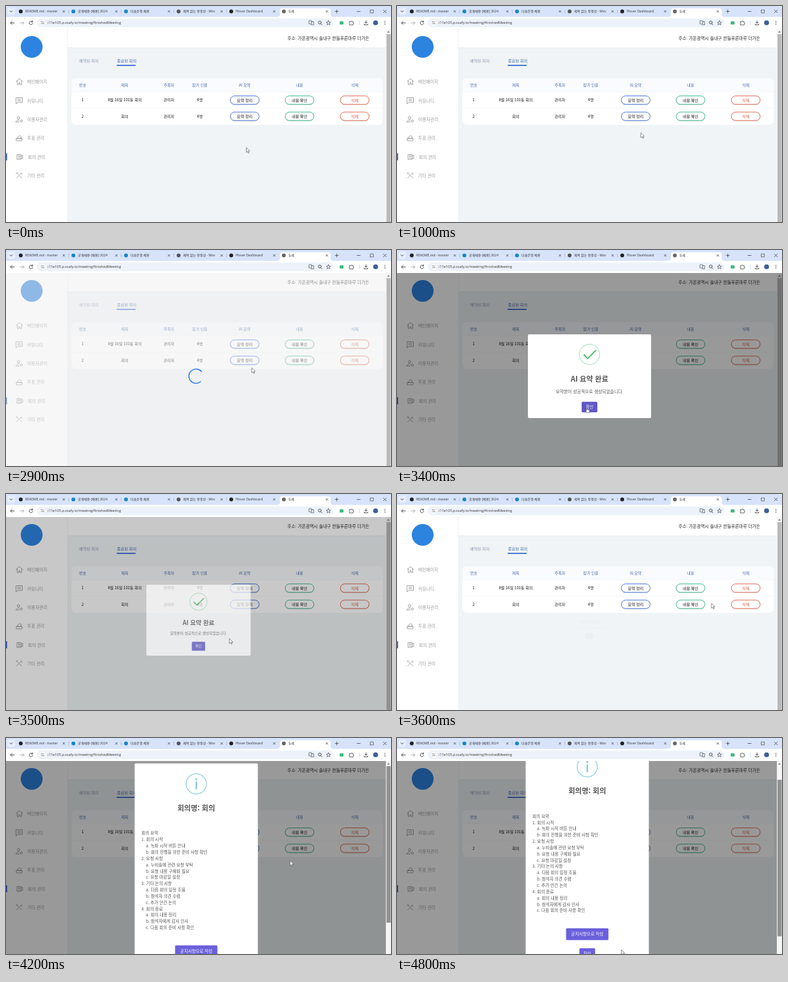
Animation of 600 by 338 pixels, one loop 5.2 s. Source, as an HTML page:

```html
<!DOCTYPE html>
<html lang="ko">
<head>
<meta charset="utf-8">
<title>회의 관리</title>
<style>
html, body { margin: 0; height: 100%; overflow: hidden; background: #fff; }
svg { display: block; width: 100vw; height: 100vh; font-family: "Noto Sans CJK KR", "Noto Sans CJK", sans-serif; }
.browser { font-family: "Open Sans", "Noto Sans CJK KR", sans-serif; }
.line { fill: none; stroke-linecap: round; stroke-linejoin: round; }
</style>
</head>
<body>
<svg id="stage" viewBox="0 0 600 338" preserveAspectRatio="none"></svg>
<script>
const LOOP = 5200;

// ---- drawing helpers: each returns SVG markup ----
const rect = (x, y, w, h, fill, r = 0, extra = '') =>
  `<rect x="${x}" y="${y}" width="${w}" height="${h}" rx="${r}" fill="${fill}" ${extra}/>`;
const disc = (x, y, r, fill, extra = '') => `<circle cx="${x}" cy="${y}" r="${r}" fill="${fill}" ${extra}/>`;
const line = (d, stroke, width = 0.9, extra = '') =>
  `<path class="line" d="${d}" stroke="${stroke}" stroke-width="${width}" ${extra}/>`;
const text = (x, y, str, size, fill, anchor = 'start', weight = 400) =>
  `<text x="${x}" y="${y + size * 0.36}" font-size="${size}" fill="${fill}" text-anchor="${anchor}" font-weight="${weight}">${str}</text>`;
const group = (id, body, extra = '') => `<g id="${id}" ${extra}>${body}</g>`;
const cross = (x, y, r, color, width) =>
  line(`M${x - r} ${y - r}l${2 * r} ${2 * r}m0 ${-2 * r}l${-2 * r} ${2 * r}`, color, width);
const scrollbarParts = (height, color, id) =>
  rect(592, 36, 8, 302, '#f4f4f4') + '<path d="M594 41.5l2-2.5l2 2.5z" fill="#777"/>' +
  rect(593, 44, 6.5, height, color, 0, `id="${id}"`);

function browser() {
  const tabs = [
    ['README.md - master', '#222'], ['공개채용-[채용] 2024', '#1787c9'], ['다솜은행 채용', '#1787c9'],
    ['제목 없는 동영상 - Mov', '#555'], ['Plover Dashboard', '#222'], ['두레', '#666']
  ];
  let out = rect(0, 0, 600, 36, '#d6e3fa') + rect(2, 2.5, 12, 11.5, '#e6eefc', 3) +
    line('M6 7.5l2 2l2-2', '#333') +
    '<path d="M421 17.5q6 0 6-5v-5q0-4 4-4h71q4 0 4 4v5q0 5 6 5z" fill="#fff"/>' +
    rect(0, 17, 600, 19, '#fff') + rect(48, 19.5, 462, 13.5, '#edf2fa', 6.7);
  tabs.forEach(([title, color], i) => {
    const x = 23 + i * 82;
    out += disc(x, 8.5, 3, color) + text(x + 7, 8.5, title, 5.1, '#333') + cross(x + 67, 8.5, 1.4, '#333', 0.7);
    if (i < 4) out += rect(x + 74, 5.5, 0.6, 6, '#9aabc8');
  });
  const dark = '#444';
  return out +
    line('M513 8.5h5m-2.5-2.5v5M547 8.5h5', dark, 0.8) +
    line('M568 6.2h4.6v4.6h-4.6z', dark, 0.7) + cross(590.5, 8.5, 2.2, dark, 0.8) +
    line('M13 26.5h-6m2.6-2.6l-2.6 2.6l2.6 2.6', dark) +
    line('M22 26.5h6m-2.6-2.6l2.6 2.6l-2.6 2.6', '#aaa') +
    line('M41.2 24.8a2.8 2.8 0 1 0 .5 2.2m-.4-4v2h-2', dark) +
    disc(57, 26.3, 4.5, '#fff') + line('M54.7 25h2.6m1.5 0h.4M54.7 27.7h.4m1.5 0h2.6', dark, 0.8) +
    text(65, 26.4, 'i11e105.p.ssafy.io/meeting/finishedMeeting', 5.63, '#333') +
    line('M472.5 23h4v5h-4zM476.5 24.5h3v5h-4', '#566', 0.8) +
    line('M490.5 27.8l1.8 1.8m-1-3.8a2.3 2.3 0 1 1-4.6 0a2.3 2.3 0 1 1 4.6 0', dark) +
    line('M502.5 23l1 2.2l2.3.2l-1.8 1.6l.6 2.4l-2.1-1.3l-2.1 1.3l.6-2.4l-1.8-1.6l2.3-.2z', dark, 0.7) +
    rect(520, 24, 6, 5, '#3dbb80', 1) +
    line('M535.5 24.5h1.7a1 1 0 1 1 2 0h1.8v1.7a1 1 0 1 1 0 2v1.5h-5.5z', dark, 0.8) +
    rect(550, 23, 0.7, 7, '#b9cdf0') +
    line('M561 23v4m-1.8-1.7l1.8 1.8l1.8-1.8m-4.6 3v1.2h5.6v-1.2', dark) +
    disc(576, 26.3, 3.8, '#3f5f96') +
    [24, 26.4, 28.8].map(y => disc(590.5, y, 0.7, dark)).join('');
}

function sidebar() {
  const items = [
    ['메인페이지', 'M16 118l5-4.5l5 4.5m-8.5-1v6h2.5v-3h2v3h2.5v-6'],
    ['커뮤니티', 'M16 143.5h9.5v7.5h-7.5l-2 2zM18.2 146h5m-5 2.3h5'],
    ['이용자관리', 'M21.5 175a2 2 0 1 1-4 0a2 2 0 1 1 4 0M15.5 181.5q0-3.2 5-3m-5 3h5m5-1.5a1.7 1.7 0 1 1-3.4 0a1.7 1.7 0 1 1 3.4 0'],
    ['투표 관리', 'M16 207.5v3.5h9v-3.5l-1.5-1.5M17.5 206l-1.5 1.5h9M18 205.5l3.5-3l2.5 2.5l-3 2.5z'],
    ['회의 관리', 'M17.5 232.5h6v7.5h-6zM23.5 235l2.5-1.5v5.5l-2.5-1.5M21.7 235a1.2 1.2 0 1 1-2.4 0a1.2 1.2 0 1 1 2.4 0M18.8 238.5q1.7-2 3.4 0'],
    ['기타 관리', 'M16.5 261l8 8m-8 0l3.3-3.3m1.8-1.8l2.9-2.9M15.8 262.5l2.2-2M23.2 262l2 1.5']
  ];
  return rect(0, 36, 96, 302, '#fff') + disc(40, 64, 17, '#2d83e0') +
    items.map(([label, icon], i) =>
      line(icon, '#999') + text(i === 4 ? 34 : 33, 119 + i * 29.3, label, 6.8, '#999')).join('') +
    rect(0, 230.5, 1.6, 11, '#3454c8');
}

function pill(x, y, label, color, ink) {
  return rect(x - 22.5, y - 5.6, 45, 13.4, '#00000020', 6.7) +
    rect(x - 22.4, y - 6.6, 44.8, 13.2, '#fff', 6.6, `stroke="${color}" stroke-width=".95"`) +
    text(x, y, label, 6.2, ink, 'middle', 500);
}

function table() {
  const columns = [119.5, 185, 254, 302, 372, 457.5, 543.5];
  const heads = ['번호', '제목', '주최자', '참가 인원', 'AI 요약', '내용', '삭제'];
  const rows = [['1', '8월 16일 101동 회의'], ['2', '회의']];
  const [, , , , summary, detail, remove] = columns;
  let out = rect(102, 113, 485, 73, '#fff', 7) +
    '<path d="M102 134v-14q0-7 7-7h471q7 0 7 7v14z" fill="#f9fbfe"/>' +
    heads.map((h, i) => text(columns[i], 124, h, 6, '#4569a8', 'middle', 500)).join('');
  rows.forEach((row, i) => {
    const y = 147.3 + i * 25.3;
    out += rect(102, y - 13, 485, 0.6, '#eef1f4') +
      [...row, '관리자', '4명'].map((s, c) => text(columns[c], y, s, 6, '#111', 'middle', 500)).join('') +
      pill(summary, y, '요약 정리', '#3b6fd6', '#111') +
      pill(detail, y, '내용 확인', '#35b38c', '#111') +
      pill(remove, y, '삭제', '#dd6549', '#d9583c');
  });
  return out;
}

function page() {
  return rect(96, 36, 504, 302, '#f0f4f6') + rect(96, 65, 496, 1, '#e6ebee') + rect(96, 36, 496, 29, '#fff') +
    text(566, 50.3, '주소: 가온광역시 솔내구 한들푸른마루 더가든', 6.75, '#222', 'end', 500) +
    text(114, 85.5, '예약된 회의', 6.2, '#8794ab') +
    text(173, 85.3, '종료된 회의', 6.2, '#3e63ad', 'start', 500) + rect(172.5, 92, 29.5, 1.7, '#3465d4') +
    table() + sidebar() + rect(95.6, 36, 0.7, 302, '#e9edef') + scrollbarParts(294, '#b9b9b9', 'pageThumb');
}

// Dialogs are drawn around x = 0 with their top edge at y = 0.
const button = (y, w, h, label, id) =>
  rect(-w / 2, y - h / 2, w, h, '#6a60dc', 1.6, `id="${id}"`) + text(0, y, label, 6.6, '#fff', 'middle', 500);

const doneDialog = () => rect(-96, 0, 192, 131, '#fff', 2) +
  disc(0, 31.3, 15.8, 'none', 'stroke="#b9e8cb" stroke-width="1.3"') +
  line('M-8.5 32l5.5 5.8l12.5-12.5', '#48bd62', 1.9, 'id="check" pathLength="1" stroke-dasharray="1 2"') +
  text(0, 70, 'AI 요약 완료', 11.25, '#545454', 'middle', 600) +
  text(0, 89.5, '요약본이 성공적으로 생성되었습니다.', 6.75, '#545454', 'middle') +
  button(113.7, 24.5, 16.5, '확인', 'confirm');

function notesDialog() {
  const notes = [
    '회의 요약', '1. 회의 시작', 'a. 녹화 시작 버튼 안내', 'b. 회의 진행을 위한 준비 사항 확인',
    '2. 요청 사항', 'a. 누비솔에 관련 요청 부탁', 'b. 요청 내용 구체화 필요', 'c. 요청 마감일 설정',
    '3. 기타 논의 사항', 'a. 다음 회의 일정 조율', 'b. 참석자 의견 수렴', 'c. 추가 안건 논의',
    '4. 회의 종료', 'a. 회의 내용 정리', 'b. 참석자에게 감사 인사', 'c. 다음 회의 준비 사항 확인'
  ];
  return rect(-96, 0, 192, 345, '#fff', 2) +
    disc(0, 32, 15.8, 'none', 'stroke="#96d5e3" stroke-width="1.4"') +
    group('mark', rect(-0.9, 28.5, 1.8, 12, '#5bbdd8') + disc(0, 24.8, 1.3, '#5bbdd8')) +
    text(0, 70, '회의명: 회의', 11.25, '#545454', 'middle', 600) +
    notes.map((s, i) => text(/^[a-c]/.test(s) ? -78.5 : -85.5, 109.3 + i * 9.85, s, 6.6, '#545454')).join('') +
    button(294, 66, 18.5, '공지사항으로 작성', 'post') + button(324.5, 24.5, 17, '확인', 'close');
}

const stage = document.getElementById('stage');
stage.innerHTML = '<clipPath id="view"><rect y="36" width="600" height="302"/></clipPath>' +
  `<g clip-path="url(#view)">${page()}` +
  group('loading', rect(0, 36, 592, 302, '#f0f0f0', 0, 'opacity=".5"') +
    group('spinner', line('M7.9 7.9A11.2 11.2 0 1 0-7.9 7.9', '#2b7ce6', 1.4))) +
  rect(0, 36, 600, 302, '#000', 0, 'id="shade"') +
  group('done', doneDialog()) + group('notes', notesDialog()) +
  group('scrollbar', scrollbarParts(245, '#919191', 'thumb')) +
  '</g>' + group('chrome', browser(), 'class="browser"') +
  group('arrow', '<path d="M0 0v7.6l1.8-1.6l1.3 2.8l1.3-.6l-1.3-2.7h2.5z" fill="#fff" stroke="#444" stroke-width=".6"/>') +
  group('hand', '<path d="M-.8 0q.8-.9 1.5 0v3l3 .8q.8.3.6 1.3l-.6 2.9h-4l-2.2-3q0-.9 1.7.1z" fill="#fff" stroke="#333" stroke-width=".6"/>');

const el = Object.fromEntries([...stage.querySelectorAll('[id]')].map(n => [n.id, n]));

// ---- motion ----
const clamp = v => Math.max(0, Math.min(1, v));
const progress = (t, from, span) => clamp((t - from) / span);
const smooth = v => v * v * (3 - 2 * v);
const set = (node, name, value) => node.setAttribute(name, value);
const show = (node, visible) => set(node, 'visibility', visible ? 'visible' : 'hidden');

// Interpolates [position, value...] stops; returns the values.
function track(stops, p, ease = v => v) {
  let i = 0;
  while (i < stops.length - 2 && p >= stops[i + 1][0]) i++;
  const [a, b] = [stops[i], stops[i + 1]];
  const k = ease(clamp((p - a[0]) / (b[0] - a[0])));
  return a.slice(1).map((v, n) => v + (b[n + 1] - v) * k);
}

const POP = [[0, 0.7], [0.45, 1.05], [0.8, 0.95], [1, 1]];
const TILT = [[0, 45, 0], [0.25, -25, 0.4], [0.5, 15, 0.8], [0.75, -5, 1], [1, 0, 1]];
const POINTER = [
  [0, 374.5, 221.5], [700, 374.5, 221.5], [1200, 383, 186], [1400, 376.5, 173.5], [2200, 376.5, 173.5],
  [2700, 383, 184.5], [2980, 383, 184.5], [3300, 296, 246.5], [3450, 296, 246.5], [3600, 490, 171],
  [3700, 458, 173.5], [4100, 458, 173.5], [4500, 362, 290], [4800, 349.5, 331.5], [LOOP, 349.5, 331.5]
];
const LOAD = 1600, DONE = 3000, CONFIRM = 3455, NOTES = 3660;

function place(node, x, y, height, scale, opacity) {
  set(node, 'transform', `translate(${x} ${y + height / 2}) scale(${scale}) translate(0 ${-height / 2})`);
  set(node, 'opacity', opacity);
}

function draw(t) {
  show(el.loading, t >= LOAD && t < DONE);
  set(el.spinner, 'transform', `translate(296.2 197.4) rotate(${120 + (t - 1900) * 0.515})`);

  const closing = progress(t, CONFIRM, 150);
  const doneOpen = t >= DONE && closing < 1;
  show(el.done, doneOpen);
  const doneScale = closing ? 1 - closing / 2 : track(POP, progress(t, DONE, 300))[0];
  place(el.done, 300, 132, 131, doneScale, 1 - closing);
  set(el.check, 'stroke-dashoffset', 1 - progress(t, DONE + 100, 250));
  show(el.check, doneOpen && t > DONE + 100);
  set(el.confirm, 'fill', t > 3250 ? '#5f56c8' : '#6a60dc');

  const scrollable = t >= NOTES + 300;
  const scroll = 26.75 * smooth(progress(t, 4300, 400));
  show(el.notes, t >= NOTES);
  show(el.scrollbar, scrollable);
  place(el.notes, scrollable ? 296.5 : 299.5, 39.75 - scroll, 345, track(POP, progress(t, NOTES, 300))[0], 1);
  const [tilt, ink] = track(TILT, progress(t, NOTES, 480));
  set(el.mark, 'transform', `rotate(${tilt} 0 32)`);
  set(el.mark, 'opacity', ink);
  set(el.thumb, 'y', 44 + scroll * 0.8);

  const dim = progress(t, DONE - 20, 100) * (1 - progress(t, CONFIRM, 100)) + progress(t, NOTES, 100);
  set(el.shade, 'opacity', 0.4 * dim);

  const [x, y] = track(POINTER, t, smooth);
  const pointing = (t >= 1350 && t < LOAD) || (t >= 3250 && t < 3480) || (t >= 3680 && t < 4110);
  for (const node of [el.arrow, el.hand]) set(node, 'transform', `translate(${x} ${y})`);
  show(el.arrow, !pointing);
  show(el.hand, pointing);
}

const start = performance.now();
function tick() {
  draw((performance.now() - start) % LOOP);
  requestAnimationFrame(tick);
}
tick();
</script>
</body>
</html>
```
